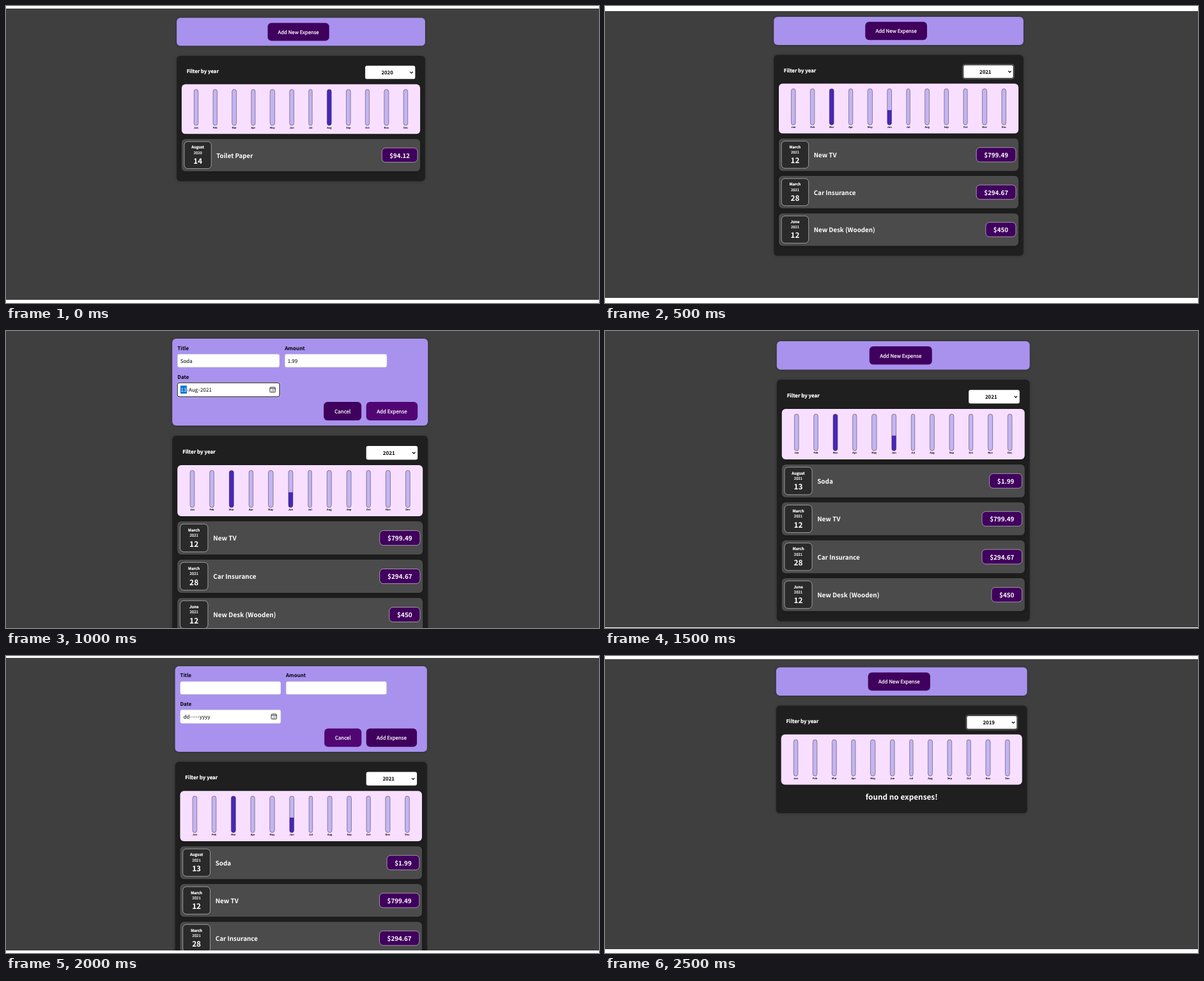
Write an HTML page that moves like this. It is 928x465 px and loops after 3 s.

```html
<!DOCTYPE html>
<html lang="en">
<head>
<meta charset="utf-8">
<title>Expense tracker</title>
<style>
  html, body { margin: 0; width: 100%; height: 100%; overflow: hidden; background: #fff; }
  svg { display: block; width: 928px; height: 465px; }
  text {
    font-family: "Noto Sans CJK JP", "Noto Sans CJK SC", "Noto Sans JP", sans-serif;
    text-rendering: geometricPrecision;
    white-space: pre;
  }
  .shadow { filter: drop-shadow(0 1px 4px rgba(0, 0, 0, .25)); }
  .small { stroke: #fff; stroke-width: .45px; }
</style>
</head>
<body>
<svg id="stage" viewBox="0 0 928 465"></svg>
<script>
const STEP = 500;
const FONT = '"Noto Sans CJK JP", "Noto Sans CJK SC", "Noto Sans JP", sans-serif';
const MONTHS = 'January February March April May June July August September October November December'.split(' ');
const PURPLE = '#40005d', HOVER = '#510674';

const soda = { title: 'Soda', amount: 1.99, month: 7, day: 13 };
const items2021 = [
  { title: 'New TV', amount: 799.49, month: 2, day: 12 },
  { title: 'Car Insurance', amount: 294.67, month: 2, day: 28 },
  { title: 'New Desk (Wooden)', amount: 450, month: 5, day: 12 }
];

// x, y, k: place and zoom of the page; top, bottom: extent of its background
const scenes = [
  { x: 267.1, y: 18.6, k: .486, top: 4, bottom: 460, year: 2020,
    items: [{ title: 'Toilet Paper', amount: 94.12, month: 7, day: 14 }] },
  { x: 264.2, y: 17, k: .4883, top: 8, bottom: 457, year: 2021, focus: true, items: items2021 },
  { x: 260.2, y: 12, k: .5, top: 0, bottom: 465, year: 2021, items: items2021,
    form: { title: 'Soda', amount: '1.99', date: ['13', '-', 'Aug', '-', '2021'], focus: true, hover: 'add' } },
  { x: 268.8, y: 16, k: .4948, top: 0, bottom: 464, year: 2021, items: [soda, ...items2021] },
  { x: 264.6, y: 16, k: .4928, top: 3, bottom: 461, year: 2021, items: [soda, ...items2021],
    form: { title: '', amount: '', date: ['dd', '-', '---', '-', 'yyyy'], hover: 'cancel' } },
  { x: 267.8, y: 17.8, k: .491, top: 5, bottom: 459, year: 2019, focus: true, items: [] }
];

const pen = document.createElement('canvas').getContext('2d');
function widthOf(str, size) {
  pen.font = `bold ${size}px ${FONT}`;
  return pen.measureText(str).width;
}

const rect = (x, y, w, h, r, fill, more = '') =>
  `<rect x="${x}" y="${y}" width="${w}" height="${h}" rx="${r}" fill="${fill}" ${more}/>`;

// box with a 1px border lying inside its edges
const box = (x, y, w, h, r, fill, border) =>
  rect(x + .5, y + .5, w - 1, h - 1, r - .5, fill, `stroke="${border}"`);

// small white text is drawn slightly heavier
function text(x, y, str, size, { bold = true, fill = '#fff', anchor = 'start' } = {}) {
  const look = fill === '#fff' && size < 20 ? ' class="small"' : '';
  return `<text x="${x}" y="${y}" font-size="${size}" font-weight="${bold ? 700 : 400}" fill="${fill}" text-anchor="${anchor}"${look}>${str}</text>`;
}

const shift = (y, body) => `<g transform="translate(0 ${y})">${body}</g>`;

const focusRing = (x, y, w, h) =>
  rect(x - 1.5, y - 1.5, w + 3, h + 3, 7, 'none', 'stroke="#fff"') +
  rect(x, y, w, h, 6, 'none', 'stroke="#101010" stroke-width="2"');

const button = (x, y, w, label, fill = PURPLE) =>
  rect(x, y, w, 58, 12, fill) +
  text(x + w / 2, y + 36, label, 16, { bold: false, anchor: 'middle' });

function calendarIcon(x, y) {
  let out = rect(x, y, 17, 16, 2.5, 'none', 'stroke="#222" stroke-width="1.8"') +
    rect(x, y + 3, 17, 2, 0, '#222');
  for (let n = 1; n < 6; n++) {
    out += rect(x + 3.5 + (n % 3) * 4, y + 7.5 + Math.floor(n / 3) * 4, 2, 2, 0, '#222');
  }
  return out;
}

function field(x, y, h, label, value) {
  return text(x, y - 13, label, 16, { fill: '#000' }) +
    box(x, y, 320, h, 6, '#fff', '#ccc') +
    text(x + 9, y + 28, value, 16, { bold: false, fill: '#000' });
}

function openForm(form) {
  const parts = form.date.map((part, i) =>
    `<tspan dx="${i ? 1 : 0}"${form.focus && !i ? ' fill="#fff"' : ''}>${part}</tspan>`).join('');
  return rect(0, 0, 800, 272, 12, '#a892ee', 'class="shadow"') +
    field(16, 48, 42, 'Title', form.title) +
    field(352, 48, 42, 'Amount', form.amount) +
    field(16, 138, 44, 'Date', '') +
    (form.focus ? focusRing(16, 138, 320, 44) + rect(25.5, 147, 20, 25, 0, '#0a74d8') : '') +
    text(26.5, 166.5, parts, 16, { bold: false, fill: '#000' }) +
    calendarIcon(305.5, 152) +
    button(474, 198, 118, 'Cancel', form.hover === 'cancel' ? HOVER : PURPLE) +
    button(607, 198, 161, 'Add Expense', form.hover === 'add' ? HOVER : PURPLE);
}

const closedForm = () =>
  rect(0, 0, 800, 90, 12, '#a892ee', 'class="shadow"') +
  button(293, 16, 198, 'Add New Expense');

function yearFilter(year, focus) {
  return text(32, 56, 'Filter by year', 16) +
    rect(607, 32, 161, 43, 6, '#fff') +
    (focus ? focusRing(607, 32, 161, 43) : '') +
    text(678, 59.5, year, 16, { fill: '#000', anchor: 'middle' }) +
    '<path d="M751.5 51.5l4.5 4.5 4.5-4.5" fill="none" stroke="#000" stroke-width="2.4"/>';
}

function chart(items) {
  const sums = MONTHS.map((_, m) =>
    items.reduce((sum, it) => it.month === m ? sum + it.amount : sum, 0));
  const max = Math.max(...sums);
  const names = MONTHS.map(m => m.slice(0, 3));
  const widths = names.map(n => widthOf(n, 8));
  const gap = (736 - widths.reduce((a, b) => a + b)) / 12;
  let x = 32 + gap / 2;
  let out = rect(16, 92, 768, 160, 12, '#f8dfff', 'class="shadow"');
  names.forEach((name, i) => {
    const w = widths[i], share = max ? Math.round(sums[i] / max * 100) / 100 : 0;
    const shape = [x + .5, 108.5, w - 1, 116, (w - 1) / 2];
    out += rect(...shape, '#c3b4f3');
    if (share) {
      out += `<clipPath id="bar${i}">${rect(x, 224 - 115 * share, w, 116, 0, '#000')}</clipPath>` +
        rect(...shape, '#4826b9', `clip-path="url(#bar${i})"`);
    }
    out += rect(...shape, 'none', 'stroke="#313131"') +
      text(x + w / 2, 234, name, 8, { fill: '#000', anchor: 'middle' });
    x += w + gap;
  });
  return out;
}

function expense(item, year) {
  const price = '$' + item.amount, w = widthOf(price, 20) + 50;
  const mid = { anchor: 'middle' };
  return rect(16, 0, 768, 104, 12, '#4b4b4b', 'class="shadow"') +
    box(24, 8, 88, 88, 12, '#2a2a2a', '#fff') +
    text(68, 31.5, MONTHS[item.month], 12, mid) +
    text(68, 48.5, year, 12, { bold: false, anchor: 'middle' }) +
    text(68, 79.5, item.day, 24, mid) +
    text(128, 60.5, item.title, 20) +
    box(776 - w, 28.5, w, 47, 12, PURPLE, '#fff') +
    text(776 - w / 2, 60.5, price, 20, mid);
}

function card({ year, items, focus }) {
  const height = items.length ? 284 + items.length * 120 : 343;
  const list = items.length
    ? items.map((it, i) => shift(268 + i * 120, expense(it, year))).join('')
    : text(400, 300, 'found no expenses!', 24, { anchor: 'middle' });
  return rect(0, 0, 800, height, 12, '#1f1f1f', 'class="shadow"') +
    yearFilter(year, focus) + chart(items) + list;
}

function draw(s) {
  const h = s.bottom - s.top;
  return `<clipPath id="page">${rect(0, s.top, 928, h, 0, '#000')}</clipPath>` +
    rect(0, s.top, 928, h, 0, '#3f3f3f') +
    `<g clip-path="url(#page)"><g transform="translate(${s.x} ${s.y}) scale(${s.k})">` +
    (s.form ? openForm(s.form) : closedForm()) +
    shift(s.form ? 304 : 122, card(s)) + '</g></g>';
}

const stage = document.getElementById('stage');
const start = performance.now();
let shown = -1;

function update(now) {
  const index = Math.floor(Math.max(0, now - start) / STEP) % scenes.length;
  if (index !== shown) {
    stage.innerHTML = draw(scenes[index]);
    shown = index;
  }
  requestAnimationFrame(update);
}
update(start);
</script>
</body>
</html>
```
